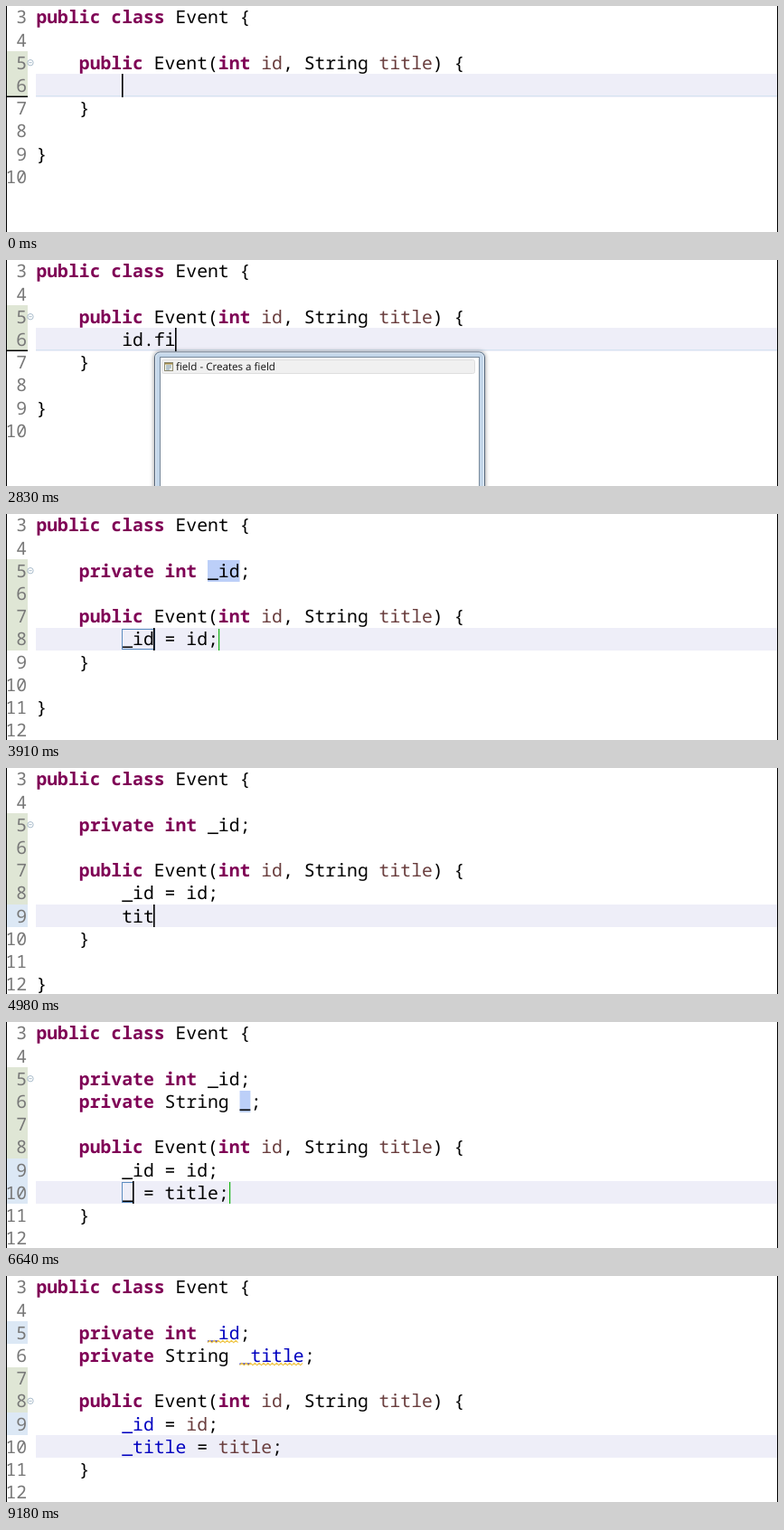
These frames come from a looping animation (854x250 px, 9.94 s). An HTML page with a canvas:

```html
<!DOCTYPE html>
<html lang="en">
<head>
<meta charset="utf-8">
<title>Postfix field completion</title>
<style>
  html, body { margin: 0; width: 100%; height: 100%; overflow: hidden; background: #fff; }
  canvas { display: block; }
</style>
</head>
<body>
<canvas id="stage" width="854" height="250"></canvas>
<script>
const ctx = document.getElementById('stage').getContext('2d');
const LOOP = 9940, WIDTH = 854, HEIGHT = 250;
const LEFT = 33.4, ADVANCE = 11.85, PITCH = 25.2, INDENT = 8;
const CODE_FONT = '19.75px "Noto Sans Mono", monospace';
const LIST_FONT = '11.6px "Open Sans", sans-serif';
const KEYWORDS = /^(public|private|class|int)$/;
const MARK_COLORS = { g: '#dfe6d5', b: '#dce8f5' };
const PROPOSALS = ['field - Creates a field', 'sysout - Sends the object to System.out.println(..)'];

const colX = col => LEFT + col * ADVANCE;
const rowY = row => Math.round(row * PITCH - 0.3);
const baseline = row => Math.round(row * PITCH + 19.4);

// Each step changes part of the editor state; a step shows the caret unless it hides it.
const steps = [];
const at = (time, change) => steps.push({ time, change: { caret: true, ...change } });
const blink = (time, caret) => at(time, { caret });

// Edits the linked name shared by a field declaration and its assignment.
function rename(time, type, name, value, before, extra = {}) {
  at(time, {
    fields: [...before.fields, `${type} ${name}`],
    body: [...before.body, `${name} = ${value};`],
    name, selected: false, linked: true, popup: null, ...extra
  });
}

const first = { fields: [], body: [] };
const second = { fields: ['int _id'], body: ['_id = id;'] };
const line2 = text => ({ body: [...second.body, text] });

at(0, { fields: [], body: [''], marks: '  gg', deleted: true, foldRow: 2,
        name: null, linked: false, selected: false, popup: null, colored: false });
blink(30, false);
blink(490, true);
blink(1020, false);
blink(1550, true);
at(1850, { body: ['i'] });
at(1960, { body: ['id'] });
at(2080, { body: ['id.'] });
at(2380, { popup: { col: 11, alpha: 0.55, count: 2 } });
at(2410, { popup: { col: 11, alpha: 1, count: 2 } });
at(2610, { body: ['id.f'] });
at(2670, { popup: { col: 11, alpha: 1, count: 1 } });
at(2830, { body: ['id.fi'] });
at(2900, { body: ['id.fie'] });
rename(2990, 'int', 'i', 'id', first, { selected: true, linked: false, deleted: false, marks: '  gggg' });
rename(3020, 'int', 'i', 'id', first, { selected: true });
rename(3520, 'int', '_', 'id', first);
rename(3810, 'int', '_i', 'id', first);
rename(3910, 'int', '_id', 'id', first);
at(4070, { name: null, linked: false });
at(4270, { ...line2(''), marks: '  ggggb' });
blink(4830, false);
[4860, 4920, 4980, 5110, 5170, 5400].forEach((time, i) => at(time, line2('title.'.slice(0, i + 1))));
at(5730, { popup: { col: 14, alpha: 0.55, count: 2 } });
at(5760, { popup: { col: 14, alpha: 1, count: 2 } });
at(5880, line2('title.f'));
at(5910, { popup: { col: 14, alpha: 1, count: 1 } });
at(5970, line2('title.fi'));
at(6050, line2('title.fie'));
rename(6280, 'String', 'string', 'title', second, { selected: true, linked: false, marks: '  ggggbb' });
rename(6310, 'String', 'string', 'title', second, { selected: true });
[6640, 7000, 7080, 7180, 7260].forEach((time, i) =>
  rename(time, 'String', '_title'.slice(0, i + 1), 'title', second));
rename(7390, 'String', '_title', 'title', second, { marks: '  b ggb' });
at(7590, { name: null, linked: false });
at(8120, { caret: false, colored: true, foldRow: 5 });
blink(8650, true);
blink(9180, false);

function stateAt(time) {
  const state = {};
  for (const step of steps) if (step.time <= time) Object.assign(state, step.change);
  return state;
}

function rect(color, x, y, w, h) {
  ctx.fillStyle = color;
  ctx.fillRect(x, y, w, h);
}

function text(string, x, y, color, font) {
  ctx.font = font;
  ctx.fillStyle = color;
  ctx.fillText(string, x, y);
}

function drawCode(line, row, colored) {
  const isConstructor = line.includes('Event(');
  let col = 0;
  for (const token of line.match(/\w+|\W+/g) || []) {
    const keyword = KEYWORDS.test(token);
    let color = '#000';
    if (keyword) color = '#7f0055';
    else if ((isConstructor || colored) && /^(id|title)$/.test(token)) color = '#6a3e3e';
    else if (colored && token[0] === '_') color = '#0000c0';
    text(token, colX(col), baseline(row), color, (keyword ? 'bold ' : '') + CODE_FONT);
    col += token.length;
  }
}

function drawGutter(state) {
  [...state.marks].forEach((mark, row) => {
    if (MARK_COLORS[mark]) rect(MARK_COLORS[mark], 1, rowY(row), 23, rowY(row + 1) - rowY(row));
  });
  if (state.deleted) rect('#000', 1, 99.5, 23, 1.5);
}

function drawFold(row) {
  const y = row * PITCH + 12.3;
  ctx.strokeStyle = '#a9bccb';
  ctx.lineWidth = 1;
  ctx.beginPath();
  ctx.arc(27, y, 3.2, 0, 2 * Math.PI);
  ctx.moveTo(25.3, y);
  ctx.lineTo(28.7, y);
  ctx.stroke();
}

function drawSquiggle(row, from, to) {
  const y = baseline(row) + 2.5;
  ctx.strokeStyle = '#f0c649';
  ctx.lineWidth = 1.1;
  ctx.beginPath();
  for (let x = colX(from), up = 0; x <= colX(to); x += 2.4, up ^= 1) ctx.lineTo(x, y + (up ? -1.2 : 1.2));
  ctx.stroke();
}

function roundBox(x, y, w, h, radius) {
  ctx.beginPath();
  ctx.roundRect(x, y, w, h, radius);
}

function drawPopup({ col, alpha, count }, top) {
  const x = Math.round(colX(col));
  ctx.save();
  ctx.globalAlpha = alpha;
  ctx.translate(x, top);
  ctx.shadowColor = 'rgba(0,0,0,.45)';
  ctx.shadowBlur = 5;
  ctx.fillStyle = '#c3d6e9';
  roundBox(0, 0.5, 366, 220, 6);
  ctx.fill();
  ctx.shadowColor = 'transparent';
  ctx.lineWidth = 1;
  ctx.strokeStyle = '#56677a';
  roundBox(0.5, 1, 365, 220, 6);
  ctx.stroke();
  ctx.strokeStyle = '#e6f0f9';
  roundBox(1.5, 2, 363, 220, 5);
  ctx.stroke();
  rect('#fff', 6, 6, 354, 220);
  ctx.strokeStyle = '#77899b';
  ctx.strokeRect(6.5, 6.5, 353, 220);
  ctx.fillStyle = '#f0f0f0';
  ctx.strokeStyle = '#dedede';
  roundBox(8.5, 9.5, 346, 15, 2);
  ctx.fill();
  ctx.stroke();
  PROPOSALS.slice(0, count).forEach((label, i) => {
    const y = 9 + i * 16;
    rect('#8d8a72', 11, y + 3, 10, 10);
    rect('#fdfbe9', 12, y + 4, 8, 8);
    rect('#a08a4c', 12, y + 4, 8, 1.5);
    for (const dy of [6.5, 8.5, 10.5]) rect('#6f8db0', 13, y + dy, dy > 10 ? 4 : 6, 1);
    text(label, 24, y + 12, '#111', LIST_FONT);
  });
  ctx.restore();
}

function draw(time) {
  const state = stateAt(time);
  const { fields, body, name } = state;
  const lines = [
    'public class Event {', '',
    ...fields.map(field => `    private ${field};`),
    ...(fields.length ? [''] : []),
    '    public Event(int id, String title) {',
    ...body.map(line => ' '.repeat(INDENT) + line),
    '    }', '', '}', ''
  ];
  const row = lines.indexOf('    }') - 1;
  const top = rowY(row), bottom = rowY(row + 1);
  const lineEnd = lines[row].length;
  const caretCol = name ? INDENT + name.length : lineEnd;

  ctx.textRendering = 'geometricPrecision';
  rect('#fff', 0, 0, WIDTH, HEIGHT);
  drawGutter(state);
  rect('#eeeef8', 33, top, WIDTH - 33, bottom - top);
  if (state.deleted) rect('#d5e4f1', 33, 99, WIDTH - 33, 1);

  if (state.linked) {
    const fieldRow = 1 + fields.length;
    const start = lines[fieldRow].length - 1 - name.length;
    rect('#bccff8', colX(start), rowY(fieldRow) + 1, name.length * ADVANCE, 24);
  }
  if (state.selected) rect('#3399f3', colX(INDENT), top, name.length * ADVANCE, bottom - top);

  lines.forEach((line, i) => {
    const number = String(i + 3);
    text(number, 23.2 - number.length * ADVANCE, baseline(i), '#787878', CODE_FONT);
    drawCode(line, i, state.colored);
  });
  if (state.selected) text(name, colX(INDENT), baseline(row), '#fff', CODE_FONT);
  drawFold(state.foldRow);

  if (state.colored) {
    drawSquiggle(2, 16, 19);
    drawSquiggle(3, 19, 25);
  }
  if (state.linked) {
    ctx.strokeStyle = '#5c8cc0';
    ctx.lineWidth = 1;
    ctx.strokeRect(128.5, top + 1.5, Math.round(name.length * ADVANCE), bottom - top - 3);
    rect('#14b414', Math.round(colX(lineEnd)), top + 1, 1.2, bottom - top - 1);
  }
  if (state.caret) rect('#000', Math.floor(colX(caretCol)), top, 1.6, bottom - top);
  if (state.popup) drawPopup(state.popup, bottom);

  rect('#000', 0, 0, 1, HEIGHT);
  rect('#000', WIDTH - 1, 0, 1, HEIGHT);
}

function frame() {
  draw(performance.now() % LOOP);
  requestAnimationFrame(frame);
}
frame();
</script>
</body>
</html>
```
